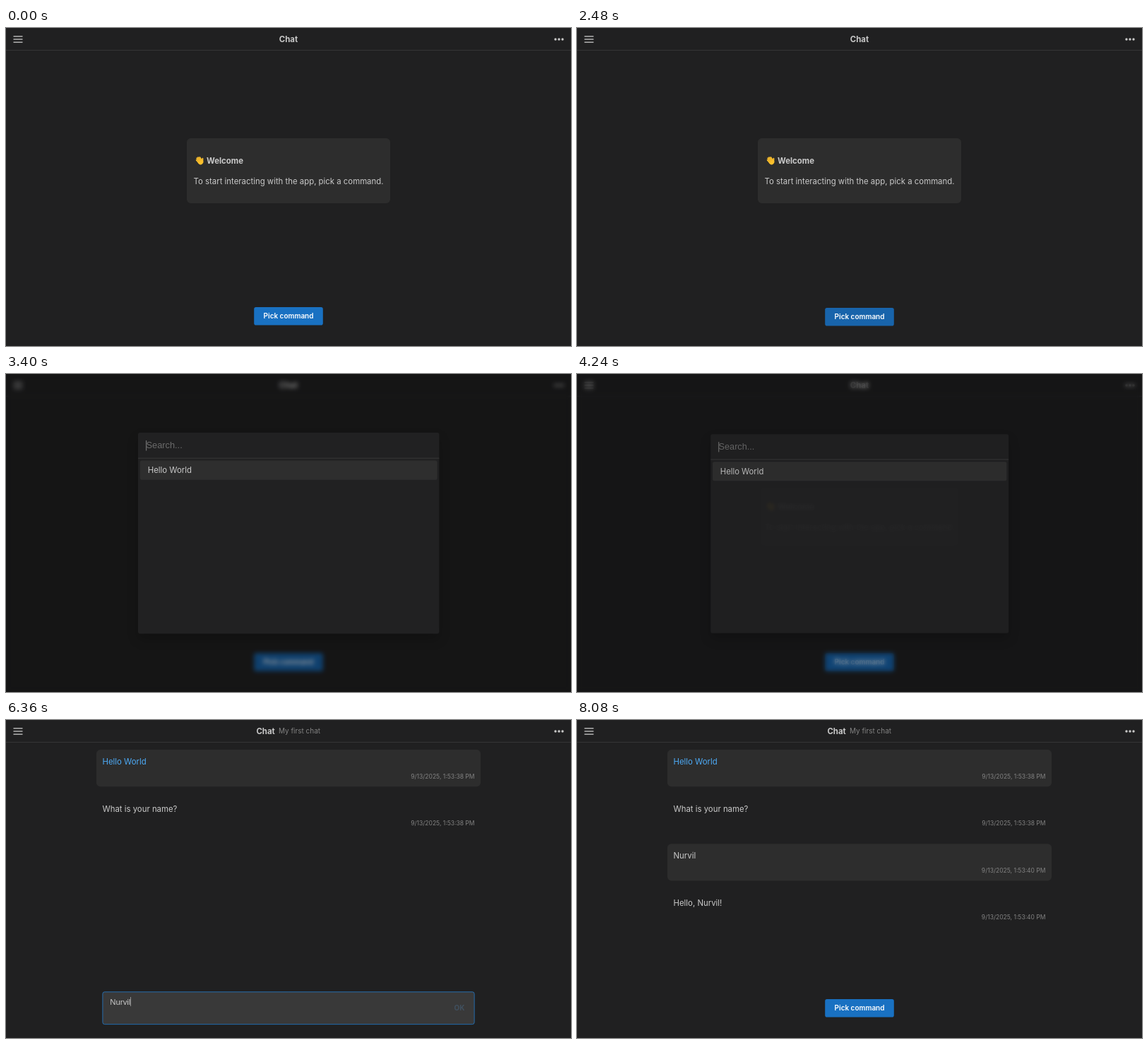
These frames come from a looping animation (800x450 px, 9 s). An HTML page with a canvas:

```html
<!DOCTYPE html>
<html lang="en">
<head>
<meta charset="utf-8">
<title>Chat</title>
<style>
  html, body { margin: 0; width: 100%; height: 100%; overflow: hidden; background: #202021; }
  canvas { display: block; width: 800px; height: 450px; }
</style>
</head>
<body>
<canvas id="stage" width="800" height="450"></canvas>
<script>
const LOOP = 9000;
const INTER = 'Inter, sans-serif';
const ARIAL = '"Liberation Sans", Arial, sans-serif';
const MD = 11.38, SM = 9.96, XS = 8.53, LG = 12.8;
const COLOR = {
  bg: '#202021', card: '#2d2d2d', line: '#3b3b3b', text: '#c9c9c9', dim: '#828282',
  blue: '#1971c2', blueHover: '#1864ab', link: '#4dabf7', ok: '#74c0fc'
};
const NAME = 'Nurvil';
const KEY_TIMES = [5200, 5480, 5560, 5760, 5920, 6080];

const stage = document.getElementById('stage');
const screen = stage.getContext('2d');
const page = document.createElement('canvas');
page.width = 800;
page.height = 450;
const pageCtx = page.getContext('2d');
let ctx = pageCtx;

const progress = (t, from, to) => Math.min(1, Math.max(0, (t - from) / (to - from)));
const ease = p => p * p * (3 - 2 * p);

function box(x, y, w, h, r, fill, stroke) {
  ctx.beginPath();
  ctx.roundRect(x, y, w, h, r);
  if (fill) { ctx.fillStyle = fill; ctx.fill(); }
  if (stroke) { ctx.strokeStyle = stroke; ctx.lineWidth = 0.8; ctx.stroke(); }
}

function text(str, x, y, size, color = COLOR.text, { weight = 400, align = 'left', family = INTER } = {}) {
  ctx.font = `${weight} ${size}px ${family}`;
  ctx.textAlign = align;
  ctx.fillStyle = color;
  ctx.fillText(str, x, y);
}

function withAlpha(alpha, draw) {
  if (alpha <= 0) return;
  ctx.save();
  ctx.globalAlpha *= alpha;
  draw();
  ctx.restore();
}

function drawHeader(inChat) {
  ctx.fillStyle = COLOR.line;
  ctx.fillRect(0, 31, 800, 0.8);
  ctx.fillStyle = COLOR.text;
  for (const y of [11.2, 15.3, 19.5]) ctx.fillRect(10.5, y, 13, 1.3);
  for (const x of [778, 783, 788]) {
    ctx.beginPath();
    ctx.arc(x, 16, 1.7, 0, Math.PI * 2);
    ctx.fill();
  }
  if (inChat) {
    text('Chat', 354.4, 19.8, MD, COLOR.text, { weight: 700 });
    text('My first chat', 386, 19.4, SM, COLOR.dim);
  } else {
    text('Chat', 400, 19.8, MD, COLOR.text, { weight: 700, align: 'center' });
  }
}

function drawWave() {
  ctx.save();
  ctx.translate(274.2, 188);
  ctx.rotate(-0.65);
  ctx.lineCap = 'round';
  ctx.strokeStyle = '#fbc02d';
  ctx.lineWidth = 2;
  const fingers = [[-2.8, -3.6], [-0.9, -5.2], [1.1, -5.2], [3, -3.8]];
  for (const [x, tip] of fingers) {
    ctx.beginPath();
    ctx.moveTo(x, tip);
    ctx.lineTo(x * 0.9, 2);
    ctx.stroke();
  }
  ctx.beginPath();
  ctx.moveTo(5.2, 0);
  ctx.lineTo(2.6, 3.4);
  ctx.stroke();
  ctx.fillStyle = '#fbc02d';
  ctx.beginPath();
  ctx.ellipse(0.1, 2, 3.7, 3.8, 0, 0, Math.PI * 2);
  ctx.fill();
  ctx.strokeStyle = '#d18a12';
  ctx.lineWidth = 0.35;
  for (const x of [-1.8, 0.1, 2]) {
    ctx.beginPath();
    ctx.moveTo(x, -3);
    ctx.lineTo(x * 0.9, 0.5);
    ctx.stroke();
  }
  ctx.restore();
}

function drawWelcome() {
  box(256, 156, 288, 92, 5.7, COLOR.card);
  drawWave();
  text('Welcome', 284, 192, MD, COLOR.text, { weight: 700 });
  text('To start interacting with the app, pick a command.', 400, 220.8, MD, COLOR.text, { align: 'center' });
}

function drawButton(fill, shift = 0) {
  box(351.2, 394.9 + shift, 97.6, 25.6, 2.8, fill);
  text('Pick command', 400, 411.3 + shift, SM, '#fff', { weight: 600, align: 'center' });
}

function drawMessage(row, str, time, color) {
  const y = 42 + row * 66.6;
  if (row % 2 === 0) box(128, y, 544, 52.2, 5.7, COLOR.card);
  text(str, 136.5, y + 21.2, MD, color);
  text(`9/13/2025, 1:53:${time} PM`, 663.5, y + 40.5, XS, COLOR.dim, { align: 'right' });
}

function drawInput(t) {
  const typed = NAME.slice(0, KEY_TIMES.filter(k => t >= k).length);
  box(136.9, 384.8, 526.2, 45.8, 2.8, '#393939', '#444');
  withAlpha(progress(t, 4720, 4840), () => box(136.9, 384.8, 526.2, 45.8, 2.8, null, COLOR.blue));
  text(typed, 147.3, 402.6, MD, COLOR.text, { family: ARIAL });
  const caretX = 147.1 + ctx.measureText(typed).width;
  ctx.fillStyle = '#a8a8a8';
  ctx.fillRect(caretX, 392, 0.8, 13);
  text('OK', 642, 411.4, SM, t < 6360 ? COLOR.ok : '#40505f', { weight: 700, align: 'center' });
}

function drawPage(t) {
  ctx = pageCtx;
  ctx.fillStyle = COLOR.bg;
  ctx.fillRect(0, 0, 800, 450);
  const inChat = t >= 4280;
  drawHeader(inChat);
  if (!inChat) {
    drawWelcome();
    drawButton(t < 1400 ? COLOR.blue : COLOR.blueHover, t >= 2440 && t < 2560 ? 1 : 0);
    return;
  }
  drawMessage(0, 'Hello World', 38, COLOR.link);
  withAlpha(progress(t, 4320, 4440), () => drawMessage(1, 'What is your name?', 38));
  withAlpha(progress(t, 4520, 4640) * (1 - progress(t, 6360, 6480)), () => drawInput(t));
  withAlpha(progress(t, 6400, 6520), () => drawMessage(2, NAME, 40));
  withAlpha(progress(t, 6440, 6560), () => drawMessage(3, `Hello, ${NAME}!`, 40));
  withAlpha(progress(t, 6480, 6600), () => drawButton(COLOR.blue));
}

function drawOverlay() {
  ctx.filter = 'blur(3px)';
  ctx.drawImage(page, 0, 0);
  ctx.filter = 'none';
  ctx.fillStyle = 'rgba(0, 0, 0, 0.36)';
  ctx.fillRect(0, 0, 800, 450);
}

function drawSpotlight(open) {
  const scale = 0.9 + 0.1 * open;
  ctx.translate(400, 225 + 7 * (1 - open));
  ctx.scale(scale, scale);
  ctx.translate(-400, -225);
  ctx.shadowColor = 'rgba(0, 0, 0, 0.2)';
  ctx.shadowBlur = 16;
  ctx.shadowOffsetY = 8;
  box(187, 83, 426.4, 284.4, 2.8, '#212122');
  ctx.shadowColor = 'transparent';
  ctx.fillStyle = COLOR.line;
  ctx.fillRect(187, 118.7, 426.4, 0.9);
  text('Search...', 198.5, 105.3, LG, '#6b6b6b', { family: ARIAL });
  ctx.fillStyle = '#999';
  ctx.fillRect(198.3, 94, 0.8, 14.5);
  box(189.8, 122.5, 420.8, 27.2, 2.8, '#2e2e2e');
  text('Hello World', 200.7, 140, MD);
}

function render(t) {
  drawPage(t);
  ctx = screen;
  ctx.drawImage(page, 0, 0);
  const open = ease(t < 4000 ? progress(t, 2560, 2760) : 1 - progress(t, 4200, 4400));
  withAlpha(open, drawOverlay);
  withAlpha(open, () => drawSpotlight(open));
}

let start;
function tick(now) {
  start ??= now;
  render((now - start) % LOOP);
  requestAnimationFrame(tick);
}
requestAnimationFrame(tick);
</script>
</body>
</html>
```
